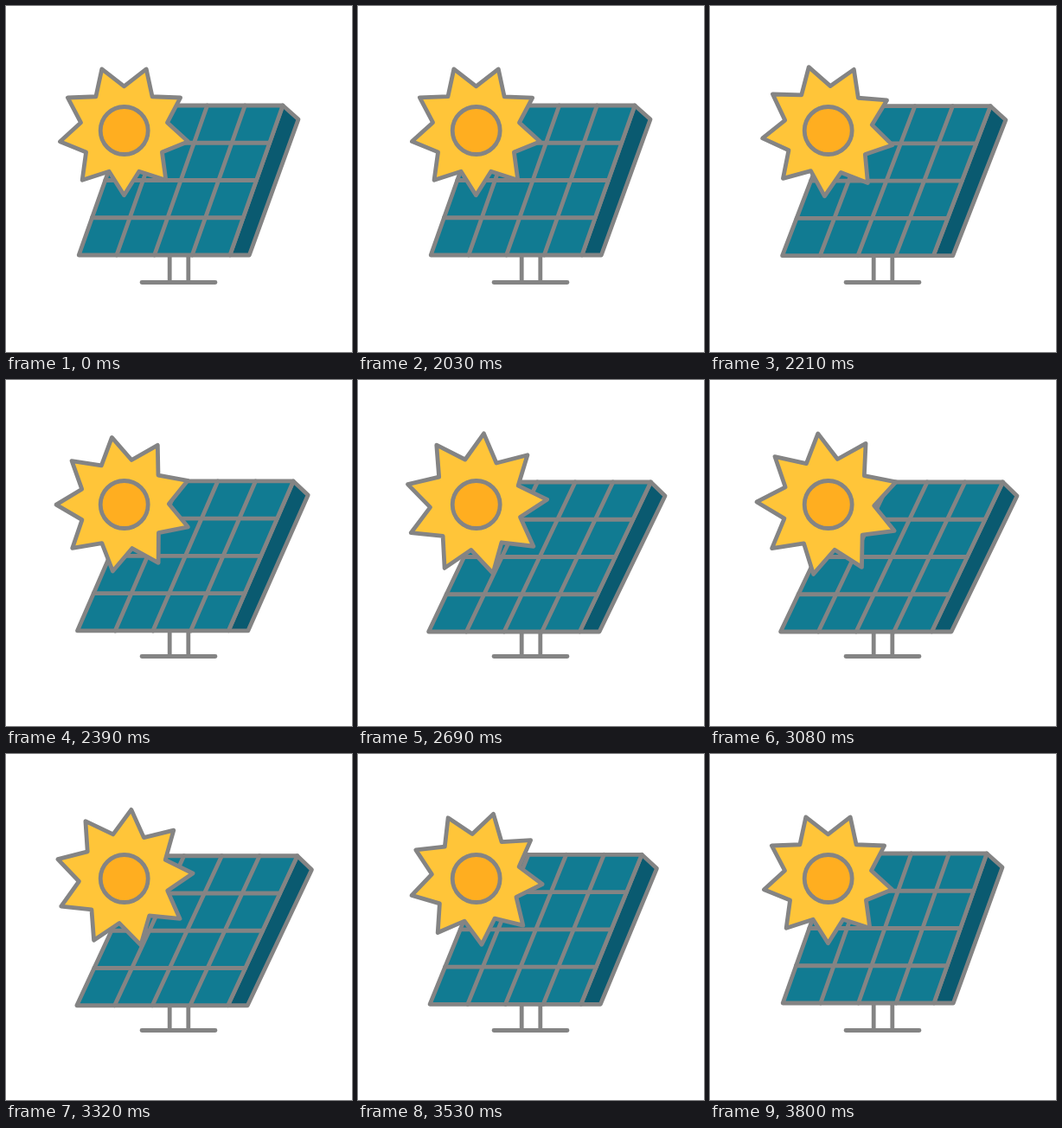
An HTML page for the animation above (3890 ms loop, 400 by 400 pixels).

```html
<!DOCTYPE html>
<html lang="en">
<head>
<meta charset="utf-8">
<title>Sun and solar panel</title>
<style>
  html, body { margin: 0; width: 100%; height: 100%; overflow: hidden; background: #fff; }
  svg { display: block; width: 100vw; height: 100vh; }
  svg * { stroke: #848484; stroke-width: 4.8; stroke-linecap: round; stroke-linejoin: round; }
</style>
</head>
<body>
<svg viewBox="0 0 400 400">
  <path fill="none" d="M189.2 288V319.5M210.8 288V319.5M157 319.5H242"/>
  <path id="side" fill="#0a5a70"/>
  <path id="front" fill="#117b92"/>
  <path id="grid" fill="none"/>
  <path id="star" fill="#ffc539"/>
  <circle cx="136.7" cy="144" r="27.5" fill="#ffae20"/>
</svg>
<script>
const LOOP = 3890, STEP = 30, MOVE_START = 2000, MOVE_END = 3800;
const begin = performance.now();
const draw = (id, d) => document.getElementById(id).setAttribute('d', d);
const poly = points => 'M' + points.map(p => p.map(v => v.toFixed(2))).join('L') + 'Z';
const line = (a, b) => `M${a}L${b}`;

// Smooth progress from 0 to 1 between two times.
function ease(t, from, to) {
  const x = Math.min(1, Math.max(0, (t - from) / (to - from)));
  return x * x * (3 - 2 * x);
}

function drawPanel(tilt) {
  const top = 115 + 3 * tilt, bottom = 288 + 3 * tilt;
  const topX = 145.3 + 18.5 * tilt, bottomX = 84.2 - 2.6 * tilt;
  const width = 174.7;
  const at = (u, v) => [topX + (bottomX - topX) * v + width * u, top + (bottom - top) * v];

  draw('front', poly([at(0, 0), at(1, 0), at(1, 1), at(0, 1)]));
  draw('side', poly([at(1, 0), [338 + 17 * tilt, 131 + 3 * tilt], [281.3 - 2.3 * tilt, bottom], at(1, 1)]));
  draw('grid', [.25, .5, .75].map(k => line(at(k, 0), at(k, 1)) + line(at(0, k), at(1, k))).join(''));
}

function drawStar(turn, grow) {
  const points = Array.from({ length: 18 }, (_, i) => {
    const radius = i % 2 ? 50.7 + 2.8 * grow : 75.2 + 8.2 * grow;
    const angle = (90 + 20 * i + turn) * Math.PI / 180;
    return [136.5 + radius * Math.cos(angle), 143.6 + radius * Math.sin(angle)];
  });
  draw('star', poly(points));
}

function frame() {
  const now = Math.max(0, performance.now() - begin) % LOOP;
  // The motion advances in steps, the first one at 2030 ms.
  const t = MOVE_START + STEP * Math.floor((now + 1 - MOVE_START) / STEP);
  const middle = (MOVE_START + MOVE_END) / 2;
  drawPanel(ease(t, 2020, 2630) - ease(t, 3210, MOVE_END));
  drawStar(80 * ease(t, MOVE_START, MOVE_END), ease(t, MOVE_START, middle) - ease(t, middle, MOVE_END));
  requestAnimationFrame(frame);
}
frame();
</script>
</body>
</html>
```
